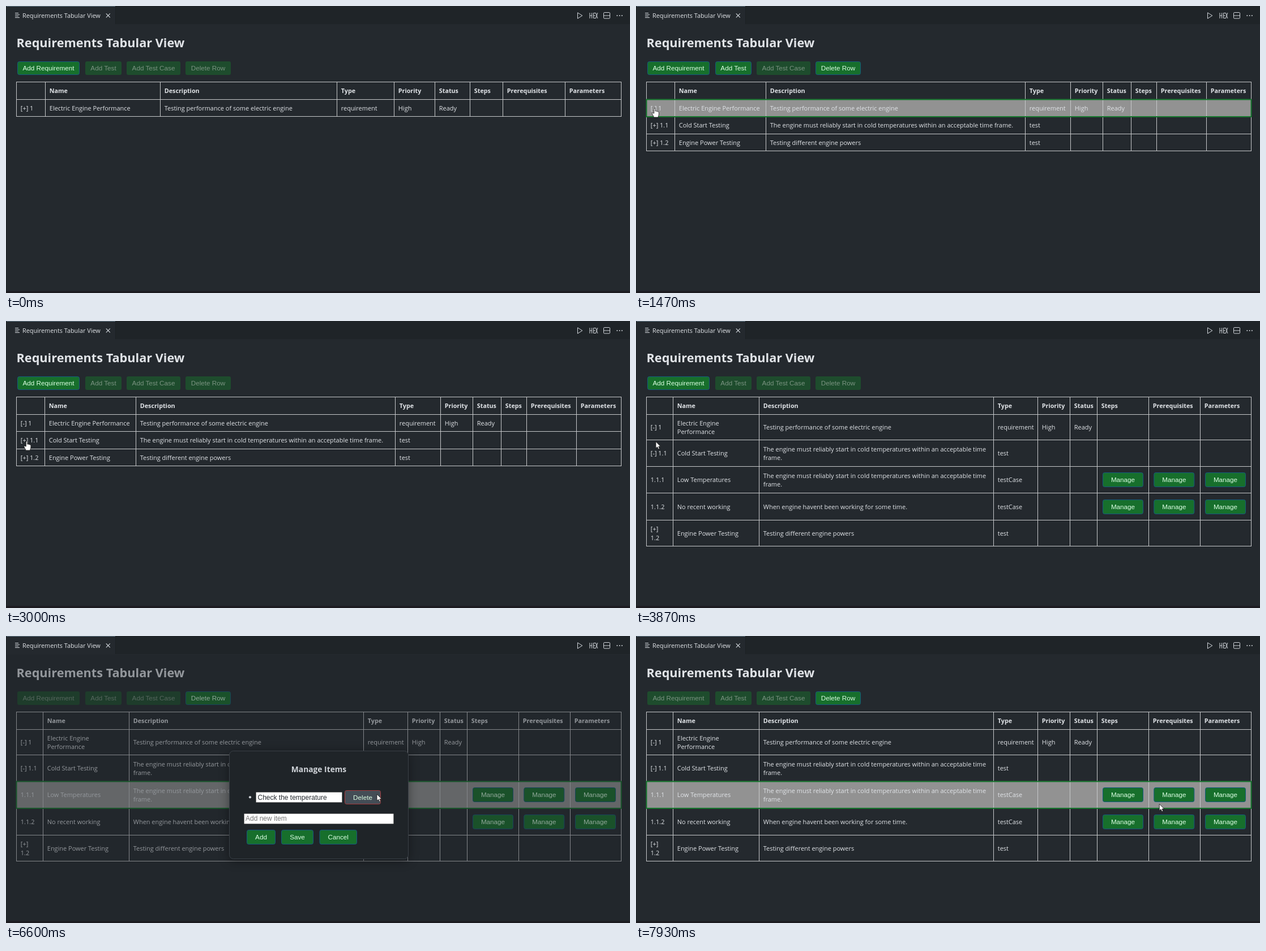
Write an HTML page that moves like this. It is 1102 by 508 pixels and loops after 8000 ms.

```html
<!DOCTYPE html>
<html lang="en">
<head>
<meta charset="utf-8">
<title>Requirements Tabular View</title>
<style>
html, body { margin: 0; width: 100%; height: 100%; overflow: hidden; background: #24292e; }
svg { display: block; width: 100vw; height: 100vh; }
text { font: 10.95px "Open Sans", "Noto Sans", sans-serif; fill: #e1e4e8; white-space: pre; }
.th { font-size: 10.75px; font-weight: 700; }
.h1 { font-size: 21.7px; font-weight: 700; }
.h3 { font-size: 13.8px; font-weight: 700; fill: #d1d5da; }
.btn { font: 11.7px "Liberation Sans", Arial, sans-serif; text-anchor: middle; fill: #dcffe4; }
.off { fill: #7b9382; }
.field { font: 12px "Liberation Sans", Arial, sans-serif; fill: #24292e; }
.hint { fill: #757575; }
.grid { fill: none; stroke: #c6c8ca; shape-rendering: crispEdges; }
.icon { fill: none; stroke: #d1d5da; }
</style>
</head>
<body>
<svg viewBox="0 0 1102 508">
  <rect width="1102" height="508" fill="#24292e"/>
  <rect width="1102" height="32" fill="#1f2428"/>
  <rect x="1" width="192" height="33" fill="#24292e"/>
  <rect x="1" width="192" height="1" fill="#5f7482"/>
  <rect x="193" width="1" height="32" fill="#1b1f23"/>
  <rect width="1" height="508" fill="#1b1f23"/>
  <rect y="504.5" width="1102" height="3.5" fill="#1c1b20"/>
  <path class="icon" d="M16 12.5h6M16 15.2h8M16 17.9h6M16 20.5h8"/>
  <text x="29" y="21" style="font-size:10.85px">Requirements Tabular View</text>
  <g class="icon">
    <path d="M176.8 13.3l7 7m0-7l-7 7" stroke-width="1.2"/>
    <path d="M1009.5 11.8v10.4l8.3-5.2z"/>
    <path d="M1031 12v10m3.7-10v10M1031 17h3.7M1041 12.5h-3.4v9h3.4M1037.6 17h3M1041.5 12l3.4 10m0-10l-3.4 10"/>
    <rect x="1055.5" y="11.5" width="11" height="10.5" rx="1.2"/>
    <path d="M1055.5 17h11"/>
  </g>
  <g fill="#d1d5da"><circle cx="1079.3" cy="17" r="1"/><circle cx="1083.6" cy="17" r="1"/><circle cx="1087.9" cy="17" r="1"/></g>
  <g id="page"></g>
  <g id="cursor" stroke="#111" stroke-width=".8" fill="#fff" stroke-linejoin="round">
    <path id="arrow" d="M0 0V11.8L2.7 9.3 4.5 13.4 6.5 12.6 4.8 8.6H8.4Z"/>
    <path id="hand" d="M-1.2 9V1a1.2 1.2 0 0 1 2.4 0V5.2c.6-.6 2-.5 2.3.4.7-.5 1.9-.2 2.1.6.8-.3 1.8.1 1.8 1.2V11c0 2-1.2 3-1.4 5H-1.6C-2 13.5-4 11.5-4.6 9.6c-.2-1.2 1-1.8 1.9-1Z"/>
  </g>
</svg>
<script>
const LOOP = 8000, RATE = 0.015; // 15 steps per second
const $ = id => document.getElementById(id);

const HEADS = ['', 'Name', 'Description', 'Type', 'Priority', 'Status', 'Steps', 'Prerequisites', 'Parameters'];
const COLD = 'The engine must reliably start in cold temperatures within an acceptable time';
const engine = (id, name) => [id, name, 'Testing performance of some electric engine', 'requirement', 'High', 'Ready'];
const POWER = ['Engine Power Testing', 'Testing different engine powers', 'test'];

const TABLES = [
  { xs: [18, 69, 272, 584, 685, 757, 819, 877, 987, 1086], ys: [134, 165, 195],
    rows: [engine('[+] 1', 'Electric Engine Performance')] },
  { xs: [18, 68, 229, 687, 767, 824, 874, 919, 1007, 1086], ys: [134, 165, 195, 226, 256],
    rows: [
      engine('[-] 1', 'Electric Engine Performance'),
      ['[+] 1.1', 'Cold Start Testing', COLD + ' frame.', 'test'],
      ['[+] 1.2', ...POWER]] },
  { xs: [18, 65, 217, 631, 709, 766, 814, 905, 996, 1086], ys: [134, 165, 210, 257, 304, 352, 398],
    rows: [
      engine('[-] 1', 'Electric Engine\nPerformance'),
      ['[-] 1.1', 'Cold Start Testing', COLD + '\nframe.', 'test'],
      ['1.1.1', 'Low Temperatures', COLD + '\nframe.', 'testCase'],
      ['1.1.2', 'No recent working', 'When engine havent been working for some time.', 'testCase'],
      ['[+]\n1.2', ...POWER]] }
];
const TOOLS = [['Add Requirement', 20, 110], ['Add Test', 140, 64], ['Add Test Case', 213, 95], ['Delete Row', 317, 80]];

// step, x, y, shape (a = arrow, h = hand, '' = hidden)
const PATH = [
  [0, 1095, 505, ''], [1, 1088, 493, 'a'], [4, 59, 210, 'a'], [5, 12, 192, ''],
  [7, 13, 192, 'a'], [8, 32, 193, 'a'], [10, 32, 193, 'a'], [11, 30, 184, 'a'],
  [12, 33, 181, 'h'], [31, 33, 181, 'h'], [43, 40, 214, 'h'], [44, 41, 213, 'h'],
  [45, 36.5, 213, 'h'], [57, 36.5, 213, 'h'], [58, 35, 213.5, 'a'], [63, 35, 213.5, 'a'],
  [76, 792, 284, 'a'], [78, 838, 284, 'h'], [80, 853, 284, 'h'], [90, 853, 284, 'a'],
  [95, 853, 284, 'a'], [99, 655, 280, 'a'], [104, 590, 352, 'h'], [113, 590, 352, 'a'],
  [119, 951, 293, 'h'], [120, 951, 293, 'h']
];

const text = (x, y, s, cls = '') => `<text x="${x}" y="${y}" class="${cls}">${s}</text>`;
const rect = (x, y, w, h, fill, more = '') => `<rect x="${x}" y="${y}" width="${w}" height="${h}" fill="${fill}" ${more}/>`;

function button(label, x, y, w, h, { off, fill = '#176f2c', edge = '#155a80', cls = '' } = {}) {
  const box = off
    ? rect(x, y, w, h, '#1e4c2d', 'rx="3"')
    : rect(x + .5, y + .5, w - 1, h - 1, fill, `rx="3" stroke="${edge}"`);
  return box + text(x + w / 2, y + h / 2 + 4, label, 'btn ' + (off ? 'off' : cls));
}

function cell(x, mid, s, cls) {
  const lines = s.split('\n');
  return lines.map((l, i) => text(x + 7.8, mid + 4 + (i - (lines.length - 1) / 2) * 15.6, l, cls)).join('');
}

function table({ xs, ys, rows }, picked, hover) {
  const left = xs[0] + .5, right = xs[9] + .5, top = ys[0] + .5, bottom = ys.at(-1) + .5;
  const mid = i => (ys[i] + ys[i + 1]) / 2 + .8;
  let out = '';
  if (picked >= 0) out += rect(left, ys[picked] + .5, right - left, ys[picked + 1] - ys[picked], '#929292');
  const lines = ys.map(y => `M${left - .5} ${y + .5}H${right + .5}`).join('') +
    xs.map(x => `M${x + .5} ${top}V${bottom}`).join('');
  out += `<path class="grid" d="${lines}"/>`;
  if (picked >= 0) {
    out += rect(left, ys[picked] + .5, right - left, ys[picked + 1] - ys[picked] + .5, 'none', 'stroke="#17772e" stroke-width="2"');
  }
  HEADS.forEach((s, i) => out += cell(xs[i], mid(0), s, 'th'));
  rows.forEach((row, r) => {
    row.forEach((s, i) => out += cell(xs[i], mid(r + 1), s));
    if (row[3] !== 'testCase') return;
    [824, 914.3, 1005].forEach((x, i) => {
      const hot = hover && r === 2 && i === 0;
      out += button('Manage', x, r === 2 ? 268 : 316, 72, 26, hot ? { fill: '#1d7233' } : {});
    });
  });
  return out;
}

function dialog(onDelete) {
  let out = rect(1, 33, 1101, 471, '#202428', 'fill-opacity=".4"');
  out += rect(394.5, 203.5, 316, 191, '#1f2428', 'rx="7" stroke="#3a4047" style="filter:drop-shadow(0 3px 9px #0006)"');
  out += text(552.5, 241, 'Manage Items', 'h3" text-anchor="middle');
  out += '<circle cx="431" cy="285.3" r="2.1" fill="#d1d5da"/>';
  out += rect(441.5, 276.5, 152, 18, '#fff', 'rx="1" stroke="#777"') + text(444.5, 289.6, 'Check the temperature', 'field');
  out += button('Delete', 598, 273, 64, 25, { fill: onDelete ? '#444d56' : '#2f363d', edge: '#a43b3d' });
  out += rect(420.5, 314.5, 264, 18, '#fff', 'rx="1" stroke="#777"') + text(423, 327.4, 'Add new item', 'field hint');
  return out + button('Add', 425, 343, 51, 26) + button('Save', 486, 343, 57, 26) + button('Cancel', 553.5, 343, 66.5, 26);
}

function page(n) {
  const stage = n < 22 ? 0 : n < 58 ? 1 : 2;
  const onEngine = n >= 15 && n < 32, onCase = n >= 91;
  const enabled = [!onCase, onEngine, false, onEngine || onCase];
  let out = text(18.5, 72.6, 'Requirements Tabular View', 'h1');
  TOOLS.forEach(([s, x, w], i) => out += button(s, x, 98, w, 24, { off: !enabled[i] }));
  out += table(TABLES[stage], onEngine ? 1 : onCase ? 3 : -1, n >= 78 && n < 91);
  if (n >= 91 && n < 113) out += dialog(n >= 98 && n < 101);
  return out;
}

function moveCursor(n) {
  const i = PATH.findLastIndex(k => k[0] <= n);
  const a = PATH[i], b = PATH[i + 1] || a;
  let p = b === a ? 0 : (n - a[0]) / (b[0] - a[0]);
  p = p * p * (3 - 2 * p);
  const at = j => a[j] + (b[j] - a[j]) * p;
  $('cursor').setAttribute('transform', `translate(${at(1)} ${at(2)})`);
  $('arrow').setAttribute('visibility', a[3] === 'a' ? 'visible' : 'hidden');
  $('hand').setAttribute('visibility', a[3] === 'h' ? 'visible' : 'hidden');
}

let shown = '', last = -1;
function draw(time) {
  const n = Math.floor((time % LOOP) * RATE + 1e-6);
  if (n === last) return;
  last = n;
  const html = page(n);
  if (html !== shown) $('page').innerHTML = shown = html;
  moveCursor(n);
}

let start;
function tick(now) {
  start ??= now;
  draw(now - start);
  requestAnimationFrame(tick);
}
draw(0);
requestAnimationFrame(tick);
</script>
</body>
</html>
```
